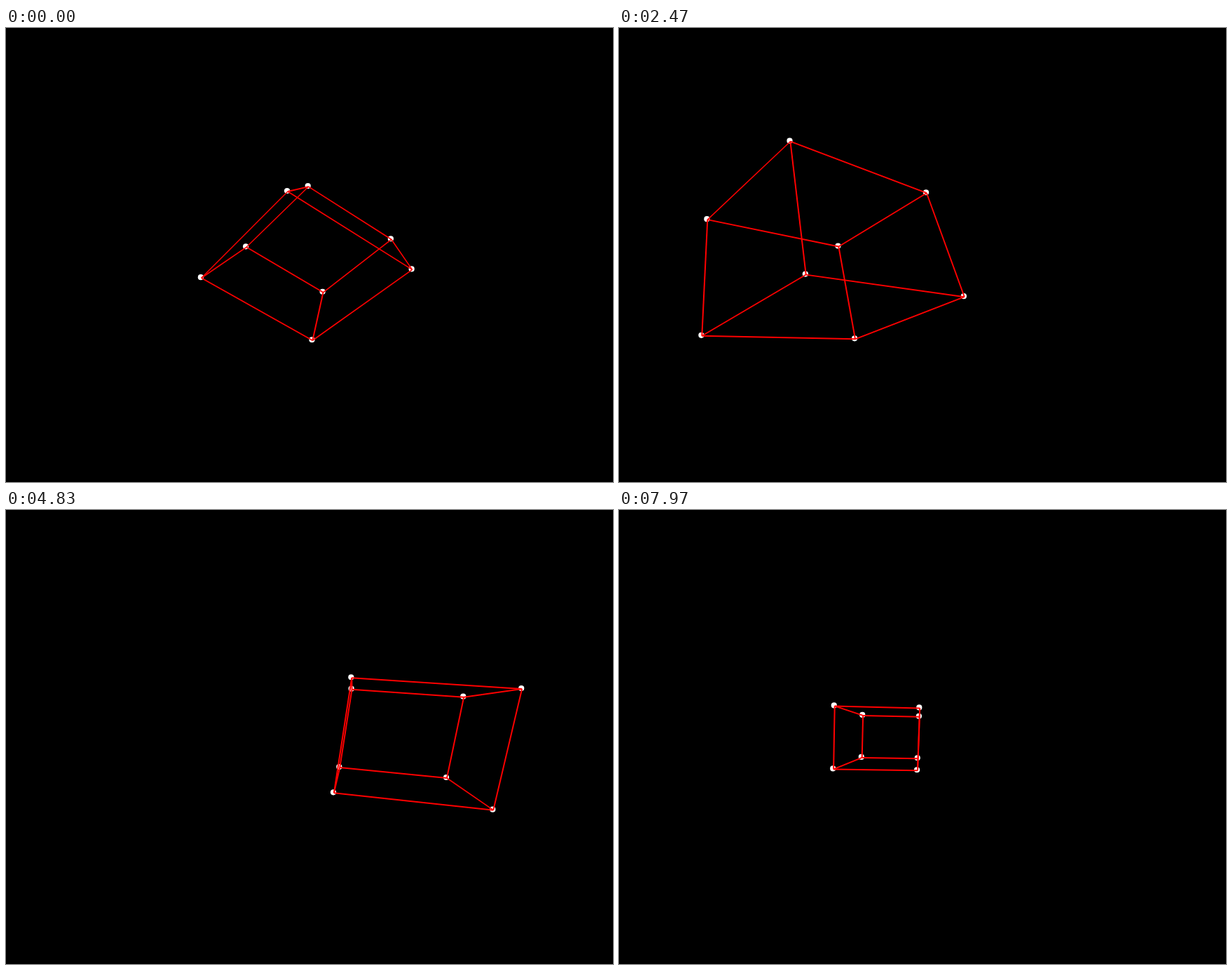
An HTML page with a canvas for the animation above (8000 ms loop, 866 px wide and 647 px high).

```html
<!DOCTYPE html>
<html>
<head>
<meta charset="utf-8">
<title>Rotating cube</title>
<style>
  html, body { margin: 0; height: 100%; overflow: hidden; background: #000; }
  canvas { display: block; }
</style>
</head>
<body>
<canvas id="stage" width="866" height="647"></canvas>
<script>
const W = 866, H = 647, LOOP = 8000, DISTANCE = 5;
const SPIN = 59.1, ZOOM_SPEED = 236, SHIFT_SPEED = 2;
const ctx = document.getElementById('stage').getContext('2d');

// Seconds spent so far inside an interval, as if a key were held down.
const held = (t, from, to) => Math.min(Math.max(t, from), to) - from;

// Steady spin after a slight run-up, in degrees.
const angleAt = t => 290 - SPIN * (t - 0.04 * (1 - Math.exp(-2 * t)));
const zoomAt = t => 438 + ZOOM_SPEED * (held(t, 1.235, 1.925) - held(t, 4.23, 5.76));
const shiftAt = t => SHIFT_SPEED *
  (held(t, 2.735, 4.3) + held(t, 7.5, 8) - held(t, 1.9, 2.7) - held(t, 5.7, 7.5));

// Bits of the index give the signs of a corner; edges join corners one bit apart.
const corners = Array.from({ length: 8 }, (_, i) => [1, 2, 4].map(bit => i & bit ? 1 : -1));
const edges = [];
for (let i = 0; i < 8; i++)
  for (const bit of [1, 2, 4]) if (!(i & bit)) edges.push([i, i | bit]);

// The same angle about x, then y, then z.
function rotate([x, y, z], a) {
  const c = Math.cos(a), s = Math.sin(a);
  [y, z] = [c * y - s * z, s * y + c * z];
  [x, z] = [c * x + s * z, c * z - s * x];
  [x, y] = [c * x - s * y, s * x + c * y];
  return [x, y, z];
}

function draw(t) {
  const angle = angleAt(t) * Math.PI / 180, zoom = zoomAt(t), shift = shiftAt(t);
  const points = corners.map(corner => {
    const [x, y, z] = rotate(corner, angle);
    const scale = zoom / (DISTANCE + z);
    return [W / 2 + (x + shift) * scale, H / 2 + y * scale * H / W];
  });

  ctx.fillStyle = '#000';
  ctx.fillRect(0, 0, W, H);
  ctx.fillStyle = '#fff';
  for (const [x, y] of points) {
    ctx.beginPath();
    ctx.arc(x + 0.3, y + 0.2, 4.1, 0, 2 * Math.PI);
    ctx.fill();
  }
  ctx.strokeStyle = '#f00';
  for (const [i, j] of edges) {
    const [x0, y0] = points[i], [x1, y1] = points[j];
    const dx = Math.abs(x1 - x0), dy = Math.abs(y1 - y0);
    // Slanted lines are thinner, as with stepped pixels.
    ctx.lineWidth = 2 * Math.max(dx, dy) / (Math.hypot(dx, dy) || 1);
    ctx.beginPath();
    ctx.moveTo(x0 + 1.2, y0 + 1.2);
    ctx.lineTo(x1 + 1.2, y1 + 1.2);
    ctx.stroke();
  }
}

const start = performance.now();
function tick() {
  const ms = (performance.now() - start) % LOOP;
  draw(Math.floor((ms + 5) * 0.03) / 30);
  requestAnimationFrame(tick);
}
tick();
</script>
</body>
</html>
```
